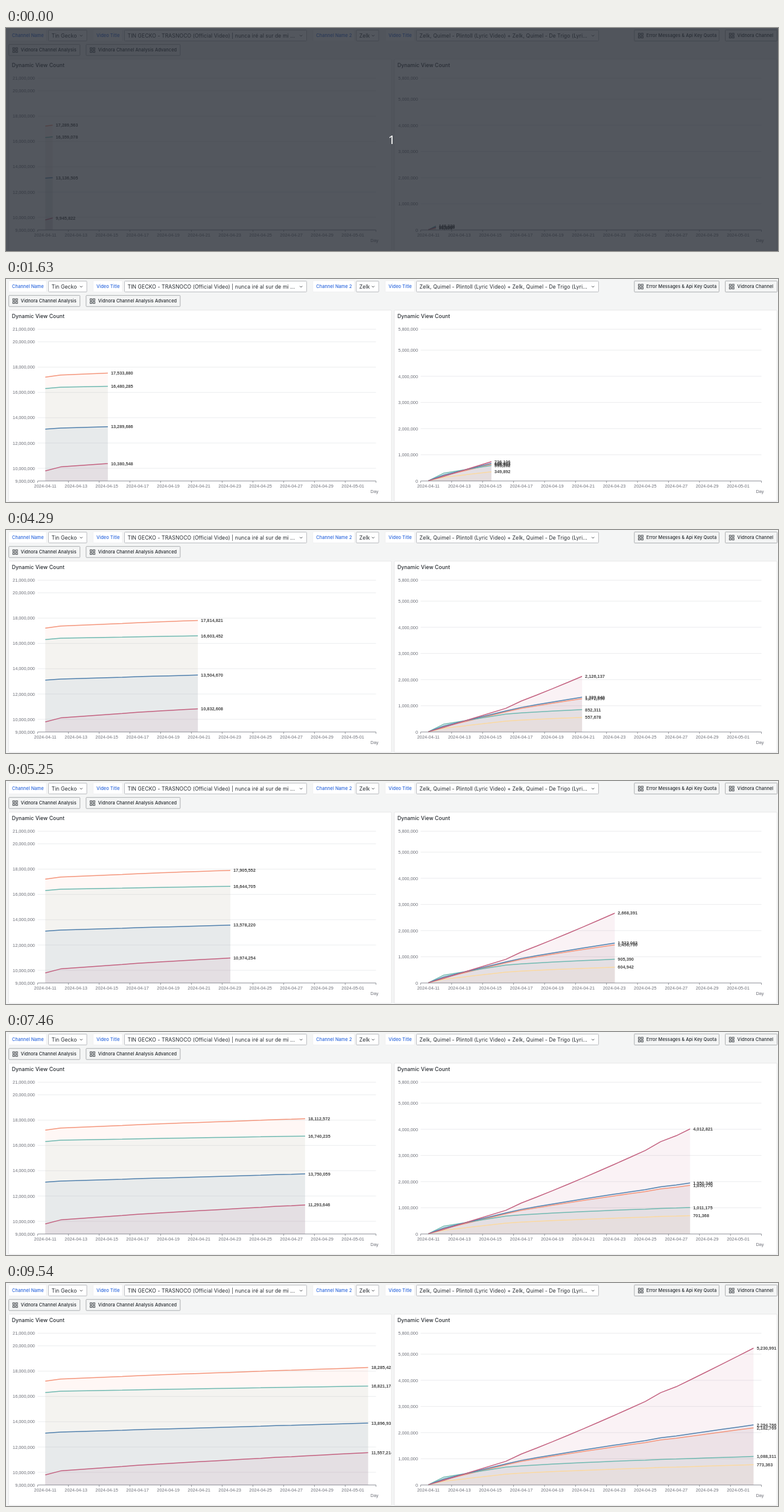
Animation of 1280x371 px, one loop 9680 ms. Source, as an HTML page:

```html
<!DOCTYPE html>
<html lang="en">
<head>
<meta charset="utf-8">
<title>Dynamic View Count</title>
<style>
  html, body { margin: 0; width: 100%; height: 100%; overflow: hidden; background: #f4f5f5; }
  svg { display: block; width: 100vw; height: 100vh; }
  text { font: 500 7.37px Inter, sans-serif; letter-spacing: .0107em; fill: #24292e; white-space: pre; }
  .title { font-size: 8.6px; }
  .value { font-size: 8.6px; font-weight: 400; }
  .key { fill: #2a66dd; }
  .axis, .end { font: 7.37px "Liberation Sans", Arial, sans-serif; letter-spacing: 0; fill: #6e7079; }
  .end { font-weight: 700; fill: #4a4a4a; }
  .count { font: 20px "Noto Sans", sans-serif; letter-spacing: 0; fill: #fff; }
</style>
</head>
<body>
<svg id="stage" viewBox="0 0 1280 371" preserveAspectRatio="none"></svg>
<script>
const LOOP = 9680, DAYS = 22, LAST = DAYS - 1, BOTTOM = 336, TOP = 83.5;
const ORANGE = '#f4957b', TEAL = '#6fb9b1', BLUE = '#5080ad', PINK = '#c3607f', YELLOW = '#fbd9a0';
const stage = document.getElementById('stage');

function add(parent, tag, attrs, content) {
  const el = document.createElementNS('http://www.w3.org/2000/svg', tag);
  for (const name in attrs) el.setAttribute(name, attrs[name]);
  if (content !== undefined) el.textContent = content;
  parent.appendChild(el);
  return el;
}
const rect = (parent, x, y, width, height, attrs) =>
  add(parent, 'rect', { x, y, width, height, ...attrs });
const line = (parent, x1, y1, x2, y2, stroke, width) =>
  add(parent, 'line', { x1, y1, x2, y2, stroke, 'stroke-width': width });
const text = (parent, cls, x, y, content, anchor = 'start') =>
  add(parent, 'text', { class: cls, x, y, dy: '.36em', 'text-anchor': anchor }, content);
const format = n => Math.round(n).toLocaleString('en-US');

// Toolbar
function label(x, width, content) {
  rect(stage, x, 3, width, 18.5, { fill: '#fff', rx: 1, stroke: '#e9eaeb', 'stroke-width': .6 });
  text(stage, 'key', x + 5.5, 12.2, content);
}
function select(x, right, content) {
  rect(stage, x, 3.5, right - x, 18, { fill: '#fff', rx: 1, stroke: '#b4b6ba', 'stroke-width': .9 });
  text(stage, 'value', x + 5, 12.7, content);
  add(stage, 'path', { d: `M${right - 11.3} 11.7l2 2l2 -2`, fill: 'none', stroke: '#3c4045', 'stroke-width': 1 });
}
function button(x, y, width, content) {
  rect(stage, x, y, width, 18.5, { fill: '#f4f5f5', rx: 1, stroke: '#a3a5a9', 'stroke-width': .9 });
  for (const dx of [6.7, 11.5]) for (const dy of [5.6, 10.4])
    rect(stage, x + dx, y + dy, 3, 3, { fill: 'none', stroke: '#33383d', 'stroke-width': .9 });
  text(stage, '', x + 20, y + 9.4, content);
}

rect(stage, 0, 0, 1280, 371, { fill: '#f4f5f5' });
label(4.5, 62.5, 'Channel Name');
select(70.5, 134, 'Tin Gecko');
label(144.5, 48.5, 'Video Title');
select(196.5, 498.5, 'TIN GECKO - TRASNOCO (Official Video) | nunca iré al sur de mi ...');
label(508.8, 69, 'Channel Name 2');
select(580.8, 618, 'Zelk');
label(628.8, 48.5, 'Video Title');
select(680.5, 982.5, 'Zelk, Quimel - Plintoll (Lyric Video) + Zelk, Quimel - De Trigo (Lyri...');
button(1041.8, 3.2, 140.5, 'Error Messages & Api Key Quota');
button(1192.6, 3.2, 86, 'Vidnora Channel');
button(4.6, 27.3, 118, 'Vidnora Channel Analysis');
button(132.8, 27.3, 156, 'Vidnora Channel Analysis Advanced');

// Views in thousands: color, first day, second day, last day, growth exponent
const charts = [
  {
    id: 'left', panelX: 4.5, x: 52.4, width: 561, min: 9000, max: 21000, step: 2000,
    series: [
      [ORANGE, 17210, 17375, 18285.423, .9],
      [TEAL, 16307, 16415, 16821.174, .95],
      [BLUE, 13096, 13180, 13896.935, .98],
      [PINK, 9792, 10111, 11557.214, .86]
    ]
  },
  {
    id: 'right', panelX: 643.8, x: 687.5, width: 565, min: 0, max: 5800, step: 1000,
    series: [
      [ORANGE, 9, 200, 2182.769, .76],
      [TEAL, 9, 300, 1088.311, .44],
      [BLUE, 9, 230, 2294.766, .78],
      [YELLOW, 9, 145, 773.363, .52],
      [PINK, 9, 180, 5230.991, 1.18]
    ]
  }
];

// Shared pace of growth after the second day, with two busy days
const pace = [[1, 0], [5, .193], [6, .254], [14, .645], [15, .706], [16, .746], [LAST, 1]];

function lerpAt(points, x) {
  const i = Math.max(1, points.findIndex(([px]) => px >= x));
  const [x0, y0] = points[i - 1], [x1, y1] = points[i];
  return y0 + (y1 - y0) * (x - x0) / (x1 - x0);
}

// One point per day; days 2 to 4 have no reading
function history([, first, second, last, power]) {
  const points = [[0, first], [1, second]];
  for (let day = 5; day <= LAST; day++)
    points.push([day, second + (last - second) * lerpAt(pace, day) ** power]);
  return points;
}

function ticksOf({ min, max, step }) {
  const ticks = [min];
  for (let v = (Math.floor(min / step) + 1) * step; v < max; v += step) ticks.push(v);
  return [...ticks, max];
}

function build(chart) {
  const { id, panelX, x, width, min, max } = chart;
  const right = x + width, band = width / DAYS;
  chart.xAt = day => x + (day + .5) * band;
  chart.yAt = v => BOTTOM - (v - min) / (max - min) * (BOTTOM - TOP);
  chart.points = chart.series.map(history);

  rect(stage, panelX, 51.8, 634.6, 318.2, { fill: '#fff', rx: 1.2, stroke: '#e2e3e5', 'stroke-width': .8 });
  text(stage, 'title', panelX + 5.2, 62, 'Dynamic View Count');
  for (const v of ticksOf(chart)) {
    const y = chart.yAt(v);
    if (v > min) line(stage, x, y, right, y, '#e6e7ea', .8);
    text(stage, 'axis', x - 4.5, y, format(v * 1000), 'end');
  }

  const clip = add(stage, 'clipPath', { id: id + 'Reveal' });
  chart.reveal = rect(clip, x, 60, 0, 280);
  const plot = add(stage, 'g', { 'clip-path': `url(#${id}Reveal)` });
  const paths = chart.points.map(points =>
    'M' + points.map(([day, v]) => `${chart.xAt(day).toFixed(2)} ${chart.yAt(v).toFixed(2)}`).join('L'));
  paths.forEach((d, i) => add(plot, 'path', {
    d: `${d}V${BOTTOM}H${chart.xAt(0)}Z`, fill: chart.series[i][0], 'fill-opacity': .078
  }));
  paths.forEach((d, i) => add(plot, 'path', {
    d, fill: 'none', stroke: chart.series[i][0], 'stroke-width': 1.5, 'stroke-linejoin': 'bevel'
  }));

  line(stage, x, BOTTOM, right, BOTTOM, '#6e7079', .8);
  for (let i = 0; i <= DAYS; i += 2) {
    const tick = x + i * band;
    line(stage, tick, BOTTOM, tick, BOTTOM + 3, '#6e7079', .7);
    if (i === DAYS) break;
    const date = new Date(Date.UTC(2024, 3, 11 + i)).toISOString().slice(0, 10);
    text(stage, 'axis', chart.xAt(i), 344.2, date, 'middle');
  }
  text(stage, 'axis', right - 2.5, 353.4, 'Day', 'middle');

  const frame = add(stage, 'clipPath', { id: id + 'Panel' });
  rect(frame, panelX, 51.8, 634.2, 318);
  const ends = add(stage, 'g', { 'clip-path': `url(#${id}Panel)` });
  chart.ends = chart.series.map(() => text(ends, 'end', 0, 0, ''));
}
charts.forEach(build);

// Recorder countdown shown at the start of each loop
const veil = add(stage, 'g', {});
rect(veil, 0, 0, 1280, 371, { fill: '#292e36', 'fill-opacity': .8 });
text(veil, 'count', 639.5, 186, '1', 'middle');

function draw(t) {
  const day = Math.min(LAST, .48 + .0022 * t);
  for (const chart of charts) {
    const tip = chart.xAt(day);
    chart.reveal.setAttribute('width', tip - chart.x);
    chart.ends.forEach((end, i) => {
      const v = lerpAt(chart.points[i], day);
      end.setAttribute('x', tip + 5);
      end.setAttribute('y', chart.yAt(v));
      end.textContent = format(v * 1000);
    });
  }
  veil.style.display = t < 40 ? '' : 'none';
}

const start = performance.now();
function tick() {
  draw((performance.now() - start) % LOOP);
  requestAnimationFrame(tick);
}
draw(0);
requestAnimationFrame(tick);
</script>
</body>
</html>
```
